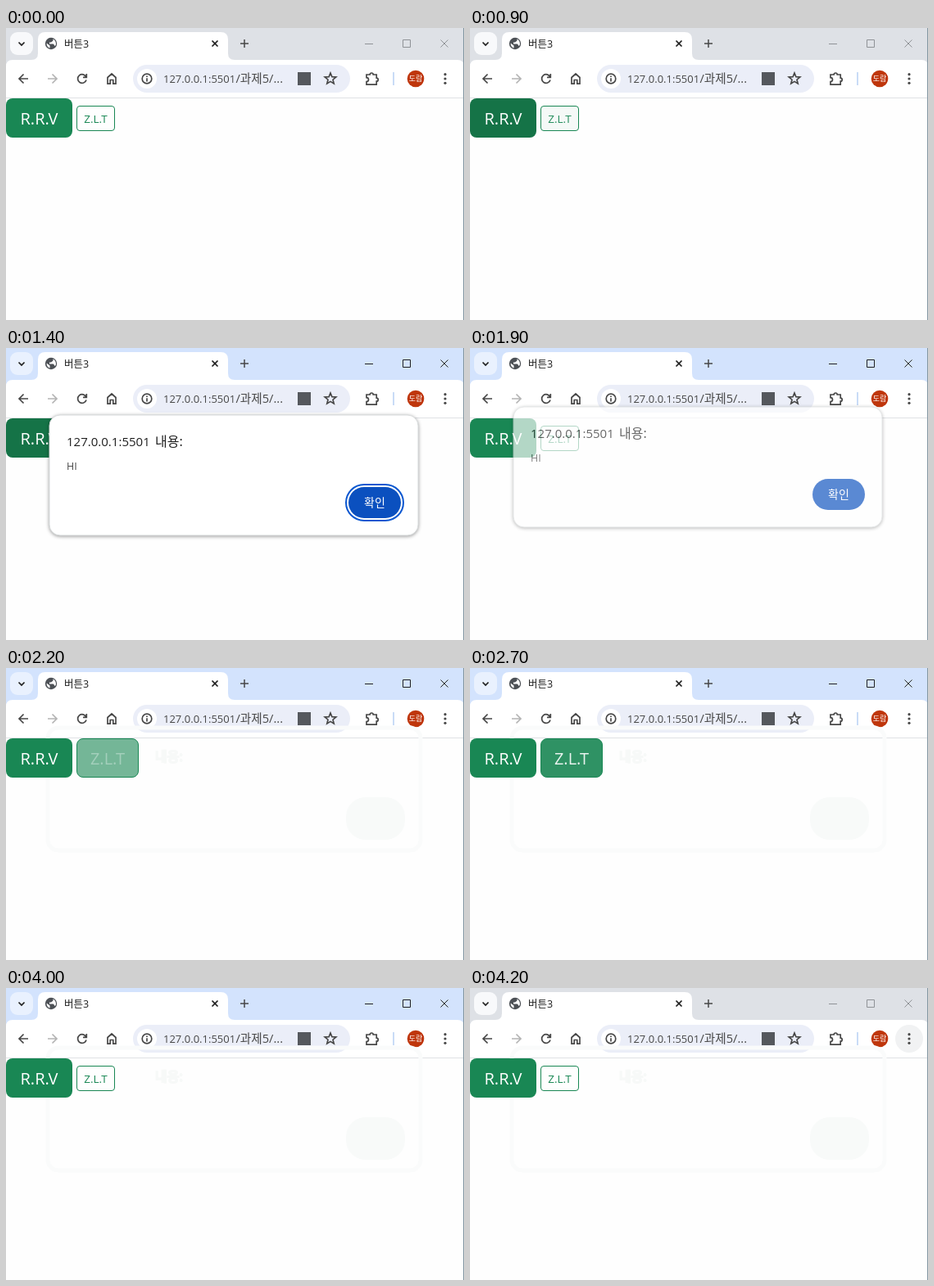
Write an HTML page that moves like this. It is 559 by 357 pixels and loops after 4.3 s.

```html
<!DOCTYPE html>
<html lang="ko">
<head>
<meta charset="utf-8">
<title>버튼3</title>
<style>
  html, body { margin: 0; width: 100%; height: 100%; overflow: hidden; background: #fefefe; }
  svg { display: block; width: 559px; height: 357px; font-family: "Open Sans", "Noto Sans CJK KR", "Noto Sans CJK", sans-serif; }
  .line { fill: none; stroke: #474747; stroke-width: 1.7; }
  .mid { text-anchor: middle; }
</style>
</head>
<body>
<svg viewBox="0 0 559 357">
  <!-- title bar -->
  <rect id="bar" width="559" height="50"/>
  <rect id="search" x="5" y="5" width="28" height="28" rx="9"/>
  <path class="line" style="stroke:#1f1f1f" d="M15.5 17.5l3.5 3.5 3.5-3.5"/>
  <path fill="#fff" d="M0 86V47q0-8 8-8H31q8 0 8-8V14q0-9 9-9H262q9 0 9 9V31q0 8 8 8H551q8 0 8 8V86z"/>
  <circle cx="55" cy="19" r="7.2" fill="#4d5156"/>
  <path fill="#fff" d="M49.5 18.5l4 3v3q-3.8-1-4-6zM54 13.5h3.5v2l-2.5 2h-2v2h5l1.5 2.5 1.2-1q1-5-3-7.5z"/>
  <text x="71" y="24" font-size="12.5" fill="#1f1f1f">버튼3</text>
  <path class="line" style="stroke:#1f1f1f" d="M251.5 15.5l7 7m0-7l-7 7"/>
  <path class="line" style="stroke-width:1.5" d="M286 19h10m-5-5v10"/>
  <path id="controls" fill="none" d="M438 19.5h10M484.5 14.5h9v9h-9zM530.5 14.5l9 9m0-9l-9 9"/>

  <!-- toolbar -->
  <path stroke="#dfe1e5" d="M0 85.5h559"/>
  <path class="line" d="M27 62H16m5.5-5.5L16 62l5.5 5.5"/>
  <path class="line" style="stroke:#b4b4b4" d="M51 62h11m-5.5-5.5L62 62l-5.5 5.5"/>
  <path class="line" d="M97.8 60a5.3 5.3 0 1 0 .2 3.5M98.3 56v4.3H94"/>
  <path class="line" d="M124 60.5l5-4.5 5 4.5v7.7h-3.2v-4.7h-3.6v4.7H124z"/>
  <rect x="155" y="45" width="265" height="34" rx="17" fill="#ebeef8"/>
  <circle cx="172" cy="62" r="12" fill="#fff"/>
  <circle class="line" cx="172" cy="62" r="5.8"/>
  <path class="line" d="M172 61.2v4.2M172 58.4v1.6"/>
  <text x="192" y="67" font-size="13" fill="#474747">127.0.0.1:5501</text>
  <text x="280.5" y="67" font-size="14.6" fill="#474747">/과제5/...</text>
  <rect x="356" y="54" width="16" height="16" fill="#55585d"/>
  <path class="line" d="M396 55l1.9 4.7 4.9.3-3.8 3.2 1.2 4.8-4.2-2.6-4.2 2.6 1.2-4.8-3.8-3.2 4.9-.3z"/>
  <path class="line" d="M440 57h4.2a2 2 0 0 1 4 0h4v4.2a2 2 0 0 1 0 4v4H440v-3.6a2.4 2.4 0 0 0 0-5z"/>
  <path stroke="#c9dcf7" stroke-width="2" d="M473 54v16"/>
  <circle cx="500" cy="62" r="10.3" fill="#bf360c"/>
  <text class="mid" x="500" y="65.3" font-size="9" fill="#fff">도람</text>
  <circle id="menuHover" cx="536" cy="62" r="17" fill="#f1f2f3"/>
  <g fill="#474747"><circle cx="536" cy="56.7" r="1.6"/><circle cx="536" cy="62" r="1.6"/><circle cx="536" cy="67.3" r="1.6"/></g>

  <!-- faint trace the dialog leaves behind -->
  <g id="trace" fill="#f8faf9">
    <rect x="51" y="73" width="455" height="150" rx="13" fill="none" stroke="#fafbfb" stroke-width="5"/>
    <rect x="415" y="158" width="72" height="52" rx="24"/>
    <text x="182" y="114" font-size="16" fill="#f4f6f5" stroke="#f7f9f8" stroke-width="2">내용:</text>
  </g>

  <!-- page buttons -->
  <rect id="first" y="86" width="81" height="48" rx="8"/>
  <text class="mid" x="40.5" y="118" font-size="20" fill="#fff">R.R.V</text>
  <rect id="second" fill="#198754" stroke="#198754"/>
  <text id="label" class="mid">Z.L.T</text>

  <!-- alert -->
  <g id="dialog">
    <rect x="53" y="82" width="450" height="147" rx="13" fill="#fff" stroke="#d9dcdd"
      style="filter:drop-shadow(0 1px 2px #0006)"/>
    <text x="74" y="120" font-size="15" fill="#1f1f1f">127.0.0.1:5501</text>
    <text x="182" y="120" font-size="16" fill="#1f1f1f">내용:</text>
    <text x="74" y="149" font-size="12.5" fill="#474747">HI</text>
    <rect id="ring" x="415" y="167" width="70" height="44" rx="22" fill="none" stroke="#0b57d0" stroke-width="2"/>
    <rect x="418" y="170" width="64" height="38" rx="19" fill="#0b50bf"/>
    <text class="mid" x="450" y="194" font-size="14" fill="#fff">확인</text>
  </g>
  <path stroke="#8497a3" d="M558.5 0V357"/>
</svg>
<script>
const LOOP = 4300, STEP = 100;
const el = id => document.getElementById(id);
const set = (id, attrs) => { for (const k in attrs) el(id).setAttribute(k, attrs[k]); };
const within = (t, from, to) => t >= from && t < to;
const mix = (a, b, k) => `color-mix(in srgb, ${b} ${k * 100}%, ${a})`;

// Linear interpolation through [time, value] keys, constant outside them.
function track(t, [first, ...rest]) {
  let [t0, v0] = first;
  for (const [t1, v1] of rest) {
    if (t < t1) return v0 + (v1 - v0) * Math.max(0, t - t0) / (t1 - t0);
    [t0, v0] = [t1, v1];
  }
  return v0;
}

const hoverFirst = [[700, 0], [900, 1], [1800, 1], [1900, 0]];
const hoverSecond = [[500, 0], [700, 1], [900, .04], [1100, 0], [2100, 0], [2200, .6], [2300, 1],
  [2600, 1], [2700, .9], [2800, 0], [2900, 0], [3000, .7], [3100, .6], [3200, 0]];
const dialogAlpha = [[1100, 0], [1400, 1], [1800, 1], [1900, .67], [2000, 0]];
const dialogShift = [[1100, -10], [1400, 0], [1800, 0], [1900, -10]];

function draw(t) {
  const active = within(t, 1100, 4200);
  set('bar', { fill: active ? '#d3e3fd' : '#dee1e6' });
  set('search', { fill: active ? '#e9f1fe' : '#f8f9fb' });
  set('controls', { stroke: active ? '#1f1f1f' : '#8f9296' });
  set('menuHover', { opacity: +(t >= 4200) });
  set('trace', { opacity: +(t >= 2000) });

  el('first').style.fill = mix('#198754', '#157347', track(t, hoverFirst));

  const large = within(t, 2200, 3000), fill = track(t, hoverSecond);
  set('second', large
    ? { x: 86.5, y: 86.5, width: 75, height: 47, rx: 7.5 }
    : { x: 86.5, y: 95.5, width: 46, height: 30, rx: 3.5 });
  set('second', { 'fill-opacity': fill });
  set('label', large ? { x: 124, y: 118, 'font-size': 20 } : { x: 109.5, y: 116, 'font-size': 13.5 });
  el('label').style.fill = mix('#198754', '#fff', fill);

  set('dialog', { opacity: track(t, dialogAlpha), transform: `translate(0 ${track(t, dialogShift)})` });
  set('ring', { opacity: +(t < 1900) });
}

const start = performance.now();
function tick() {
  const t = (performance.now() - start) % LOOP;
  draw(Math.floor(t / STEP) * STEP);
  requestAnimationFrame(tick);
}
tick();
</script>
</body>
</html>
```
